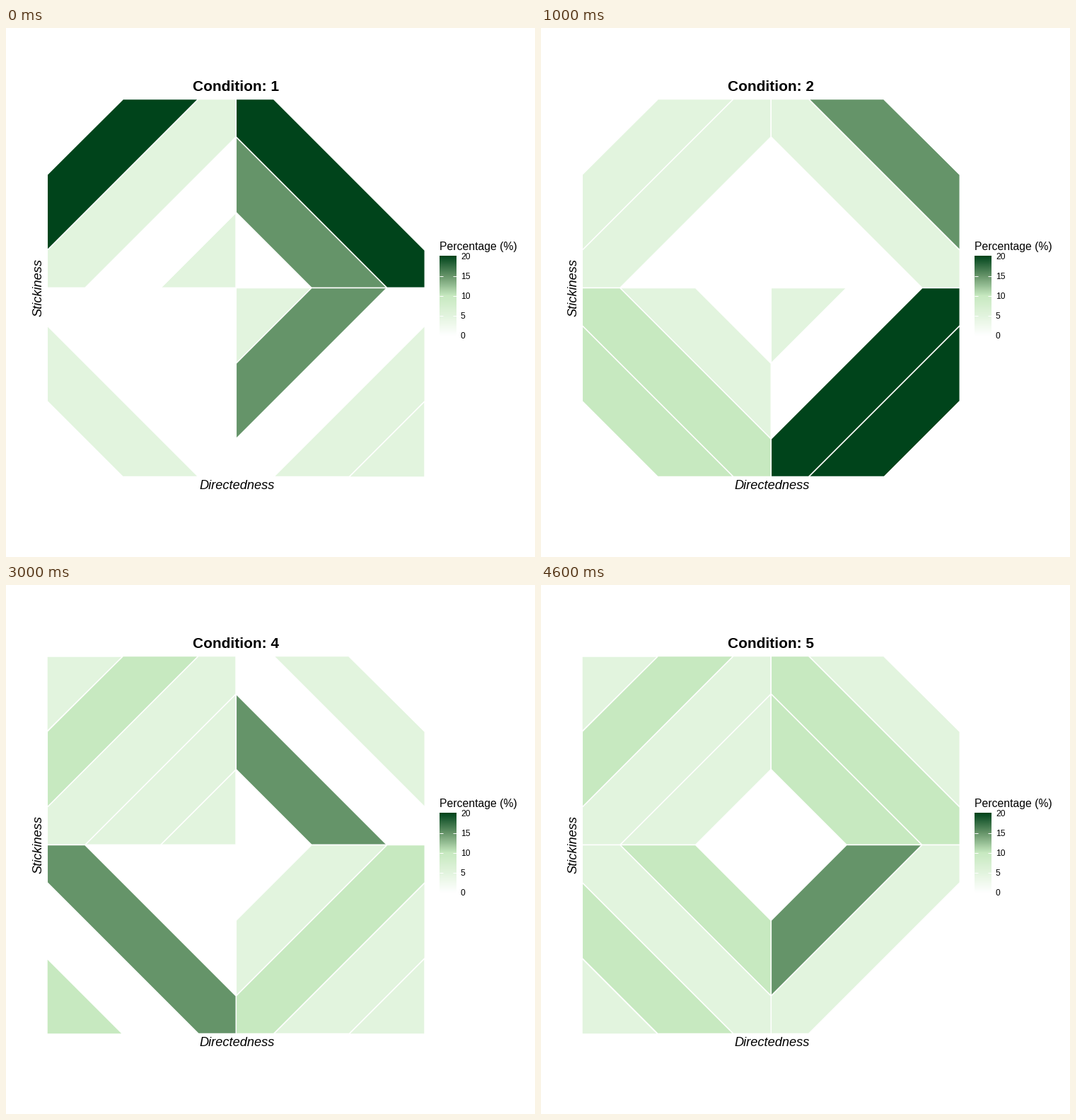
Recreate the animation shown at these times as a matplotlib script. Size 748 px wide and 748 px high, loop 5 s.

```python
import numpy as np
import matplotlib.pyplot as plt
from matplotlib.animation import FuncAnimation
from matplotlib.collections import PolyCollection
from matplotlib.colors import LinearSegmentedColormap

SIZE, DPI = 748, 100
PX = 72 / DPI                      # points per pixel
CX, CY, HALF = 325.3, 367.5, 267
BANDS, STEP = 5, 0.4

CMAP = LinearSegmentedColormap.from_list(
    "greens", ["#ffffff", "#e2f4de", "#c7e9c0", "#669469", "#00441b"], N=512)

# Share of each band in steps of 5 %, centre to corner;
# quadrants: top left, top right, bottom right, bottom left.
CONDITIONS = [
    "10140 03400 13011 00010",
    "00110 00130 10440 01220",
    "01210 01101 01111 02331",
    "11121 03010 01211 00302",
    "01121 02210 03100 02121",
]
QUADRANTS = [(-1, -1), (1, -1), (1, 1), (-1, 1)]


def band(k, sx, sy):
    """Part of a unit quadrant where x + y lies within one step."""
    lo, hi = k * STEP, (k + 1) * STEP
    a, b = min(lo, 1), min(hi, 1)
    pts = [(a, lo - a), (b, hi - b), (hi - b, b), (lo - a, a)]
    if lo < 1 < hi:
        pts[1:1] = [(1, 0)]
        pts[4:4] = [(0, 1)]
    if k == 0:
        pts = pts[:3]
    return [(CX + sx * HALF * x, CY + sy * HALF * y) for x, y in pts]


def label(x, y, text, px, **kw):
    return ax.text(x, y, text, fontsize=px * PX, color="black",
                   va="baseline", **kw)


plt.rcParams["font.family"] = "Liberation Sans"
fig = plt.figure(figsize=(SIZE / DPI, SIZE / DPI), dpi=DPI, facecolor="white")
ax = fig.add_axes([0, 0, 1, 1])
ax.set_axis_off()

tiles = PolyCollection(
    [band(k, *q) for q in QUADRANTS for k in range(BANDS)],
    edgecolors="white", linewidths=1.5 * PX, joinstyle="miter")
ax.add_collection(tiles)

title = label(CX, 89, "", 20.9, ha="center", weight="bold")
label(326.5, 651.5, "Directedness", 18.3, ha="center", style="italic")
label(50.5, CY - 0.5, "Stickiness", 18.3, ha="center", style="italic",
      rotation=90, rotation_mode="anchor")

# Colour bar
LEFT, RIGHT, TOP, BOTTOM = 613.5, 637, 322.5, 435
label(612.8, 314, "Percentage (%)", 15.8)
ax.imshow(np.linspace(1, 0, 300)[:, None], cmap=CMAP, vmin=0, vmax=1,
          extent=(LEFT, RIGHT, BOTTOM, TOP), aspect="auto")
for value in range(0, 21, 5):
    y = 434.8 - value * 5.59
    label(643, y + 4.3, str(value), 12)
    if 0 < value < 20:
        for x in (LEFT, RIGHT - 4.6):
            ax.plot([x, x + 4.6], [y, y], color="white", lw=PX,
                    solid_capstyle="butt")

ax.set_xlim(0, SIZE)
ax.set_ylim(SIZE, 0)


def update(i):
    levels = [int(c) for c in CONDITIONS[i].replace(" ", "")]
    tiles.set_facecolor(CMAP(np.array(levels) / 4))
    title.set_text(f"Condition: {i + 1}")
    return tiles, title


anim = FuncAnimation(fig, update, frames=len(CONDITIONS), interval=1000,
                     repeat=True, repeat_delay=0)
plt.show()
```
